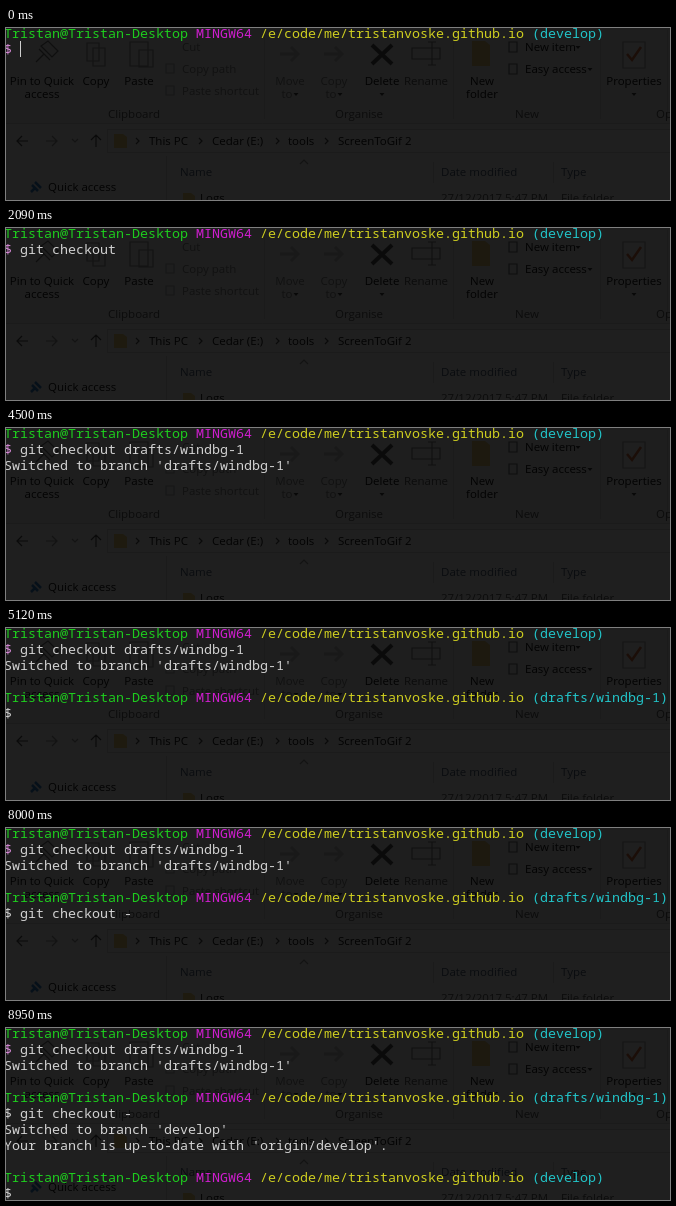
Animation of 664 by 172 pixels, one loop 9.1 s. Source, as an HTML page:

```html
<!DOCTYPE html>
<html lang="en">
<head>
<meta charset="utf-8">
<title>git checkout -</title>
<style>
  html, body { margin: 0; width: 100%; height: 100%; overflow: hidden; background: #1c1c1c; }
  svg { display: block; width: 664px; height: 172px; }
  #desk text { font: 11.5px "Open Sans", "Noto Sans", sans-serif; fill: #111; }
  #desk .off { fill: #8a8a8a; }
  #desk .label { fill: #5c5c5c; }
  #desk .head { fill: #4c607a; }
  #desk .mid { text-anchor: middle; }
  #term text { font: 500 13.333px "Noto Sans Mono", "DejaVu Sans Mono", monospace; white-space: pre; }
</style>
</head>
<body>
<svg viewBox="0 0 664 172" xmlns="http://www.w3.org/2000/svg">
  <g id="desk">
    <rect width="664" height="172" fill="#fff"/>
    <rect width="664" height="95" fill="#f5f6f7"/>
    <path d="M0 95.5H664M101.5 101.5H664M101.5 124.5H664M101.5 101V125M258.5 2V91M447.5 2V91M594.5 2V91M661.5 2V91M160.5 128V172M427.5 134V155M547.5 134V155" stroke="#e2e2e2" fill="none"/>
    <g fill="none" stroke="#777" stroke-width="1.2">
      <path d="M30 34l8-8m-5-5l11 11m-9-14l11 11 6-6-10-10z"/>
      <path d="M81 15h12v18h-12zM87 20h12v18h-12zM124 14h18v24h-18zM133 22h14v17h-14z" stroke="#999"/>
      <path d="M160 36h8v9h-8zM160 58h8v9h-8z" stroke="#bbb"/>
      <path d="M274 26h18m-7-7l7 7-7 7M318 26h18m-7-7l7 7-7 7" stroke="#ccc" stroke-width="3"/>
      <path d="M366 17l20 19m0-19l-20 19" stroke="#555" stroke-width="4"/>
      <path d="M406 20h28v11h-28zM426 14v23m-4-23h8m-8 23h8" stroke="#888"/>
      <path d="M466 13h13l5 4v21h-18z" fill="#f2d27a" stroke="none"/>
      <path d="M503 14h8v10h-8zM503 36h8v10h-8z"/>
      <path d="M617 14h22v26h-22z" fill="#fff" stroke="#aaa"/>
      <path d="M621 26l5 6 9-13" stroke="#e07040" stroke-width="2.5"/>
      <path d="M22 113h-11m5-5l-5 5 5 5M90 119v-12m-5 5l5-5 5 5" stroke="#555"/>
      <path d="M40 113h11m-5-5l5 5-5 5M66 111l3 3 3-3" stroke="#999"/>
      <path d="M108 106h9l4 3v11h-13z" fill="#f6d77a" stroke="none"/>
      <path d="M177 165h8l4 3v6h-12z" fill="#f6d77a" stroke="none"/>
      <path d="M294 136l4-4 4 4" stroke="#999"/>
      <path d="M25 164l4-4m-3-3l6 6m-3-9l6 6" stroke="#2e84d0" stroke-width="2.5"/>
      <path id="chevrons" stroke="#555"/>
    </g>
    <path id="carets" fill="#444"/>
  </g>
  <rect width="664" height="172" fill="#000" opacity=".88"/>
  <g id="term"></g>
  <rect id="cursor" width="1" height="16" fill="#cfcfcf"/>
</svg>
<script>
const NS = "http://www.w3.org/2000/svg";
const LOOP = 9100, CELL = 8, LEFT = -2, LINE = 16;
const GREY = "#d2d2d2", GREEN = "#1ecc1e", PINK = "#d01ed0", YELLOW = "#cece20", CYAN = "#22c4c8", ROSE = "#dc8cdc";
const byId = id => document.getElementById(id);
const desk = byId("desk"), term = byId("term"), cursor = byId("cursor");

function addText(parent, x, y, str, attrs = {}) {
  const el = document.createElementNS(NS, "text");
  el.setAttribute("x", x);
  el.setAttribute("y", y);
  for (const key in attrs) el.setAttribute(key, attrs[key]);
  el.textContent = str;
  parent.appendChild(el);
  return el;
}

// Explorer window seen through the terminal
const labels = {
  mid: [
    [36, 57, "Pin to Quick"], [36, 70, "access"], [90, 57, "Copy"], [133, 57, "Paste"],
    [376, 57, "Delete"], [476, 57, "New"], [476, 70, "folder"], [628, 57, "Properties"]
  ],
  "mid label": [[128, 90, "Clipboard"], [353, 90, "Organise"], [521, 90, "New"], [420, 57, "Rename"]],
  "mid off": [[284, 57, "Move"], [281, 70, "to"], [328, 57, "Copy"], [325, 70, "to"]],
  off: [[176, 23, "Cut"], [176, 45, "Copy path"], [176, 67, "Paste shortcut"]],
  plain: [
    [519, 23, "New item"], [519, 45, "Easy access"],
    [143, 117, "This PC"], [206, 117, "Cedar (E:)"], [282, 117, "tools"], [332, 117, "ScreenToGif 2"],
    [42, 163, "Quick access"], [194, 174, "Logs"]
  ],
  head: [[174, 148, "Name"], [435, 148, "Date modified"], [555, 148, "Type"]],
  label: [[650, 90, "Open"], [435, 174, "27/12/2017 5:47 PM"], [555, 174, "File folder"]]
};
for (const cls in labels)
  for (const [x, y, str] of labels[cls]) addText(desk, x, y, str, { class: cls });

byId("chevrons").setAttribute("d",
  [130, 193, 270, 319].map(x => `M${x} 110l3 3-3 3`).join(""));
byId("carets").setAttribute("d",
  [[290, 66], [334, 66], [376, 66], [628, 66], [572, 19], [584, 41]]
    .map(([x, y]) => `M${x - 2.5} ${y - 1}h5l-2.5 3z`).join(""));

// Terminal lines, each with the time it appears
const timed = [];
const colX = col => LEFT + col * CELL;

function print(at, row, col, str, fill = GREY) {
  const el = addText(term, colX(col), 10 + row * LINE, str, { fill });
  timed.push({ at, el });
  return el;
}

function prompt(at, row, branch, sign = GREY) {
  print(at, row, 0, "Tristan@Tristan-Desktop", GREEN);
  print(at, row, 24, "MINGW64", PINK);
  print(at, row, 32, "/e/code/me/tristanvoske.github.io", YELLOW);
  print(at, row, 66, `(${branch})`, CYAN);
  print(at, row + 1, 0, "$", sign);
}

prompt(0, 0, "develop", ROSE);
print(4360, 2, 0, "Switched to branch 'drafts/windbg-1'");
prompt(4570, 4, "drafts/windbg-1");
print(8240, 6, 0, "Switched to branch 'develop'");
print(8240, 7, 0, "Your branch is up-to-date with 'origin/develop'.");
prompt(8400, 9, "develop");

// Typed commands: [time, characters shown]
const commands = [
  {
    start: 0, row: 1, text: "git checkout drafts/windbg-1 ",
    keys: [[150, 1], [280, 2], [410, 3], [540, 4], [680, 5], [820, 6], [900, 7], [1020, 8], [1150, 9],
      [1320, 10], [1440, 12], [1560, 13], [2260, 14], [2410, 15], [2730, 20], [3190, 21], [3650, 29]]
  },
  {
    start: 4570, row: 5, text: "git checkout -",
    keys: [[5520, 1], [5660, 2], [5800, 3], [5940, 4], [6080, 5], [6220, 6], [6290, 7], [6410, 8], [6540, 9],
      [6690, 10], [6760, 11], [6840, 12], [6920, 13], [7470, 14]]
  },
  { start: 8400, row: 10, text: "", keys: [] }
];
for (const cmd of commands) cmd.el = print(cmd.start, cmd.row, 2, "");

const cursorOff = [[2090, 2260], [4110, 4570], [5120, 5520], [8000, 8400], [8950, LOOP]];

function render(t) {
  for (const { at, el } of timed) el.style.display = t >= at ? "" : "none";
  for (const { start, row, text, keys, el } of commands) {
    if (t < start) continue;
    const shown = keys.reduce((n, [at, count]) => t >= at ? count : n, 0);
    const str = text.slice(0, shown);
    if (el.textContent !== str) el.textContent = str;
    cursor.setAttribute("x", colX(2 + shown));
    cursor.setAttribute("y", row * LINE - 3);
  }
  const hidden = cursorOff.some(([from, to]) => t >= from && t < to);
  cursor.style.display = hidden ? "none" : "";
}

const begin = performance.now();
function tick() {
  render((performance.now() - begin) % LOOP);
  requestAnimationFrame(tick);
}
tick();
</script>
</body>
</html>
```
